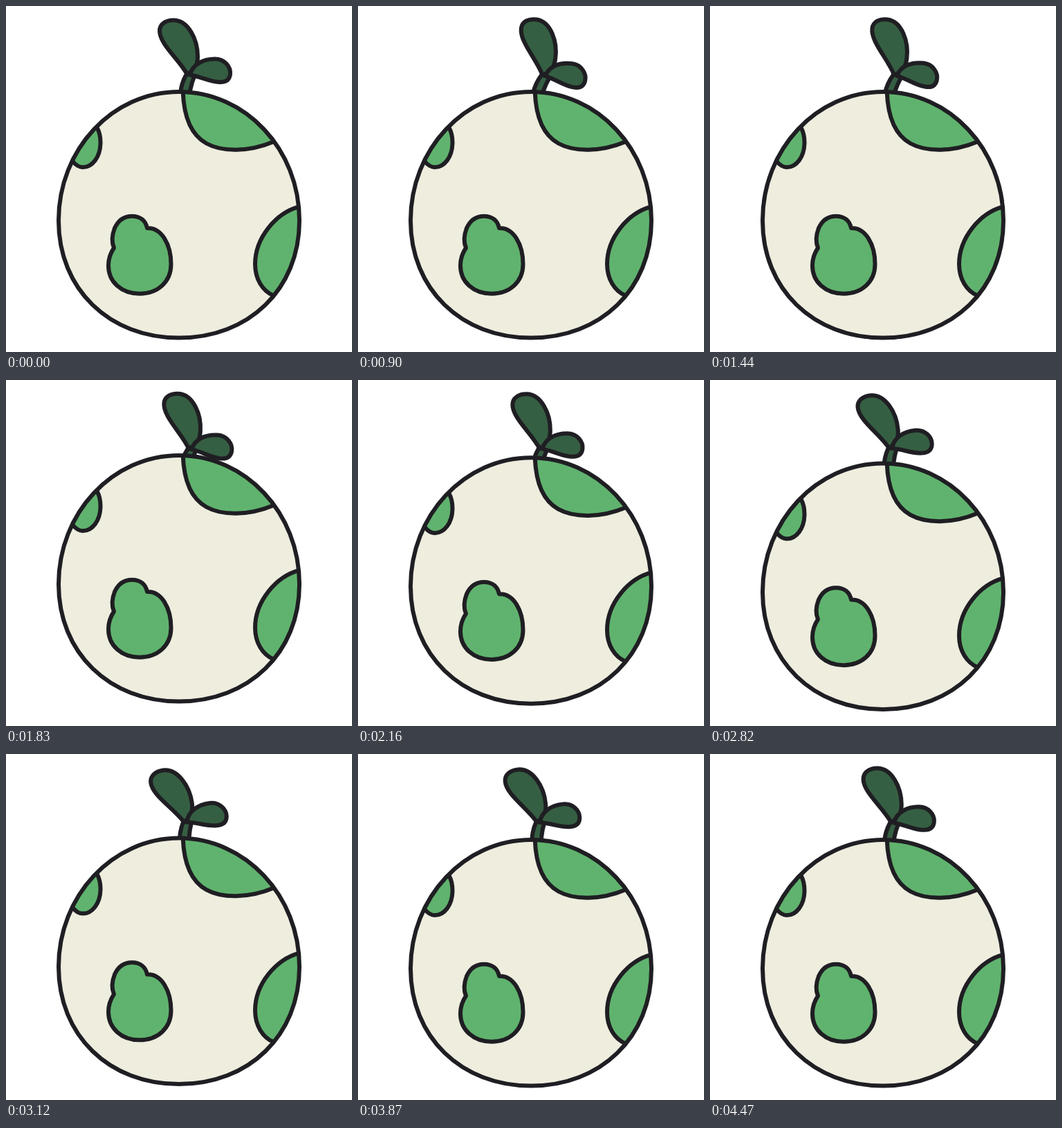
Write an HTML page that moves like this. It is 500 by 500 pixels and loops after 4.5 s.

```html
<!DOCTYPE html>
<html lang="en">
<head>
<meta charset="utf-8">
<title>Sprouting fruit</title>
<style>
  html, body { margin: 0; width: 100%; height: 100%; overflow: hidden; background: #fff; }
  svg { display: block; width: 100%; height: 100%; }
</style>
</head>
<body>
<svg viewBox="0 0 500 500">
  <defs>
    <path id="shell" d="M250 124 C346 124 424 207 424 310 C424 409 351 479.5 250 479.5 C149 479.5 76 409 76 310 C76 207 154 124 250 124 Z"/>
    <clipPath id="inside"><use href="#shell"/></clipPath>
  </defs>
  <g stroke="#1f1e23" stroke-width="6" stroke-linecap="round" stroke-linejoin="round">
    <g id="sprout" fill="#355f42">
      <path d="M261 98 C256 107 252 116 251 138 L264.5 138 C265 122 268 112 272 102"/>
      <path d="M262 99 C250 77 222 55 222 36 C222 26 231 20.5 242 20.5 C263 20.5 277 48 277 73 C277 83 275 88 269 94 Z"/>
      <path d="M266 99.5 C270 84 285 76.5 302 76.5 C316 76.5 325 88 324 98.5 C323 107 317 110.5 308 110 C294 109.5 283 102.5 266 99.5 Z"/>
    </g>
    <g id="fruit">
      <use href="#shell" fill="#eeedde" stroke="none"/>
      <g clip-path="url(#inside)" fill="#60b36e">
        <path d="M255.7 124 C257 160 267 186 289.5 198.5 C312 211 350 211.5 387 196 L440 176 L420 90 L256 90 Z"/>
        <path d="M131.7 176 C136 184 136.7 191 136.5 199 C136 218 125 233 111 233 C105 233 100 229 96.5 224.5 L70 198 L110 150 Z"/>
        <path d="M424 290 C390 299 360 335 360 373 C360 395 371 412 386.5 418.5 L440 440 L450 284 Z"/>
        <path d="M156 349.5 C152 340 153.5 330 157 321 C162 310 171 303.7 182 303.7 C195 303.7 202 311 204 321 C225 320 238.5 345 238.5 373 C238.5 399 219 415.7 193 415.7 C167 415.7 148 399 148 375 C148 364 151 357 156 349.5 Z"/>
      </g>
      <use href="#shell" fill="none"/>
    </g>
  </g>
</svg>
<script>
  const LOOP = 4500, SWING = 10, HOP = 15;
  const RISE = 1650, PEAK = 1830, REST = 3800;
  const sprout = document.getElementById('sprout');
  const fruit = document.getElementById('fruit');

  // Triangle wave: 0, 1, 0, -1, 0 over one loop
  const sway = p => 1 - Math.abs(((p + 0.25) % 1) * 4 - 2);

  function bounceOut(x) {
    const k = 7.5625, n = x * 2.75;
    if (n < 1) return k * x * x;
    const [mid, floor] = n < 2 ? [1.5, 0.75] : n < 2.5 ? [2.25, 0.9375] : [2.625, 0.984375];
    const d = x - mid / 2.75;
    return k * d * d + floor;
  }

  function lift(t) {
    if (t <= RISE || t >= REST) return 0;
    if (t < PEAK) return HOP * (t - RISE) / (PEAK - RISE);
    return HOP * (1 - bounceOut((t - PEAK) / (REST - PEAK)));
  }

  function draw(t) {
    sprout.setAttribute('transform', `rotate(${SWING * sway(t / LOOP)} 257 133)`);
    fruit.setAttribute('transform', `translate(0 ${-lift(t)})`);
  }

  let start;
  function tick(now) {
    start ??= now;
    draw(Math.max(0, now - start) % LOOP);
    requestAnimationFrame(tick);
  }
  draw(0);
  requestAnimationFrame(tick);
</script>
</body>
</html>
```
